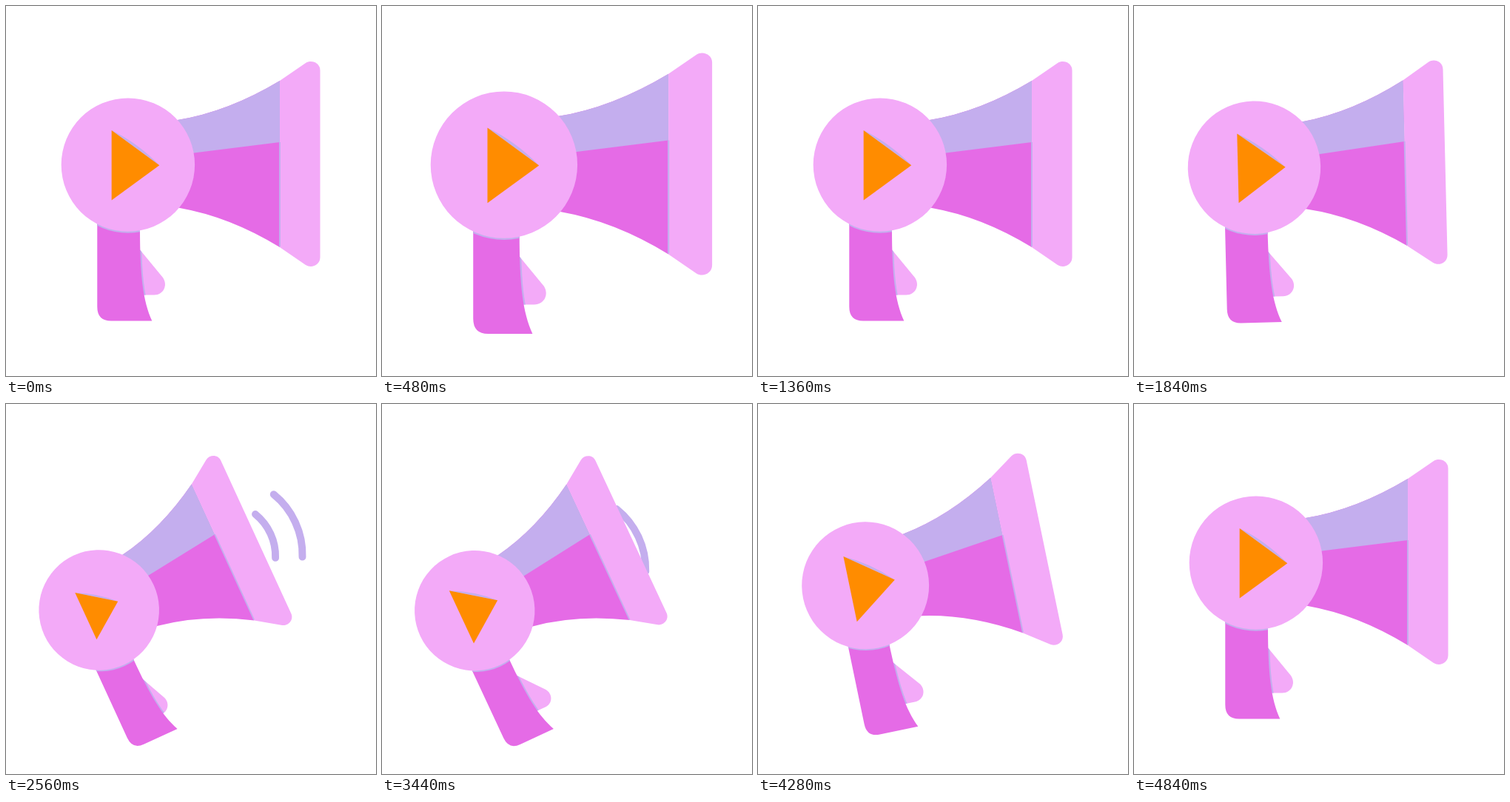
An HTML page with a canvas that plays this animation: 500 by 500 pixels, repeating every 5000 ms.

```html
<!DOCTYPE html>
<html lang="en">
<head>
<meta charset="utf-8">
<title>Megaphone</title>
<style>
  html, body { margin: 0; width: 100%; height: 100%; overflow: hidden; background: #fff; }
  canvas { display: block; width: 100vw; height: 100vh; }
</style>
</head>
<body>
<canvas width="500" height="500"></canvas>
<script>
const ctx = document.querySelector('canvas').getContext('2d');
const LOOP = 5000, STEP = 40;
const PINK = '#f3aaf8', MAGENTA = '#e56be6', LAVENDER = '#c4aeee', ORANGE = '#ff8c00';

const shapes = {
  horn: new Path2D('M200 160L232 154Q300 143 370 101V326Q303 285 235 273L200 267Z'),
  hornTop: new Path2D('M200 160L232 154Q300 143 370 101V184L250 199L200 205Z'),
  flare: new Path2D('M370 101L405 77C413 72 424.5 77 424.5 87V339.5C424.5 350 413 355 405 350L370 326Z'),
  handle: new Path2D('M123.3 215V406.5Q123.3 425.5 142 425.5H197.3C185 398 181 365 181 300V215Z'),
  handleEdge: new Path2D('M197.3 425.5C185 398 181 365 181 300'),
  trigger: new Path2D('M170 316L212 367C219 377 213 390.5 200 390.5H165Z'),
  disc: new Path2D('M74.7 214.6a90.2 90.2 0 1 0 180.4 0a90.2 90.2 0 1 0 -180.4 0Z'),
  play: new Path2D('M142.7 168L207.3 215.2L142.7 262.4Z'),
  playShade: new Path2D('M142.7 168Q178 185 207.3 215.2Z')
};

// Smooth 0..1 ramp between two times
function ramp(t, from, to) {
  const p = Math.min(1, Math.max(0, (t - from) / (to - from)));
  return p * p * (3 - 2 * p);
}
// Rise, hold, fall
const bump = (t, a, b, c, d) => ramp(t, a, b) - ramp(t, c, d);
// The same bump played for each of the two calls
const call = (t, a, b, c, d) => bump(t, a, b, c, d) + bump(t - 1000, a, b, c, d);

function fill(path, color) {
  ctx.fillStyle = color;
  ctx.fill(path);
}

function group(draw) {
  ctx.save();
  draw();
  ctx.restore();
}

function transformAt(x, y, scale, degrees = 0) {
  ctx.translate(x, y);
  ctx.rotate(degrees * Math.PI / 180);
  ctx.scale(scale, scale);
  ctx.translate(-x, -y);
}

function drawWave(t, radius, peak) {
  const out = call(t, 2300, peak, 3040, 3280);
  if (out <= 0) return;
  ctx.strokeStyle = LAVENDER;
  ctx.lineWidth = 11;
  ctx.lineCap = 'round';
  ctx.beginPath();
  ctx.arc(288 + 146 * out, 218, radius, -0.46, 0.46);
  ctx.stroke();
}

function drawHandle(t) {
  const handleScale = 1 + 0.1 * bump(t, 80, 620, 660, 1160);
  const triggerScale = 1 + 0.1 * bump(t, 120, 660, 740, 1240);
  const press = 19 * call(t, 2420, 2620, 2960, 3160);
  group(() => {
    group(() => {
      transformAt(124, 215, triggerScale);
      transformAt(174, 322, 1, press);
      fill(shapes.trigger, PINK);
      ctx.clip(shapes.trigger);
      // Back to the handle's own space, keeping the clip
      transformAt(174, 322, 1, -press);
      transformAt(124, 215, handleScale / triggerScale);
      ctx.strokeStyle = LAVENDER;
      ctx.lineWidth = 4;
      ctx.stroke(shapes.handleEdge);
    });
    transformAt(124, 215, handleScale);
    fill(shapes.handle, MAGENTA);
    ctx.clip(shapes.handle);
    transformAt(124, 215, 1 / handleScale);
    transformAt(165, 214.5, discScale(t));
    ctx.translate(0, 2);
    fill(shapes.disc, LAVENDER);
  });
}

function drawHorn(t) {
  group(() => {
    transformAt(165, 213, 1 + 0.1 * bump(t, 80, 620, 660, 1160));
    fill(shapes.horn, MAGENTA);
    fill(shapes.hornTop, LAVENDER);
    fill(shapes.flare, PINK);
    ctx.fillStyle = LAVENDER;
    ctx.fillRect(369, 184, 2, 141);
  });
}

const discScale = t => 1 + 0.1 * bump(t, 0, 500, 560, 1060);

function drawDisc(t) {
  group(() => {
    transformAt(165, 214.5, discScale(t));
    fill(shapes.disc, PINK);
  });
  group(() => {
    const pulse = 0.1 * bump(t, 100, 640, 700, 1200);
    transformAt(145, 212, 1 + pulse - 0.19 * call(t, 2320, 2600, 3000, 3250));
    fill(shapes.playShade, LAVENDER);
    fill(shapes.play, ORANGE);
  });
}

function draw(t) {
  ctx.fillStyle = '#fff';
  ctx.fillRect(0, 0, 500, 500);
  group(() => {
    const tilt = bump(t, 1710, 2620, 3760, 4760);
    ctx.translate(-40.8 * tilt, 45.4 * tilt);
    transformAt(207, 232, 1 - 0.1 * tilt, -25 * tilt);
    drawWave(t, 81, 2800);
    drawWave(t, 116, 2775);
    drawHorn(t);
    drawHandle(t);
    drawDisc(t);
  });
}

function tick() {
  const t = performance.now() % LOOP;
  draw(Math.floor(t / STEP) * STEP);
  requestAnimationFrame(tick);
}
tick();
</script>
</body>
</html>
```
